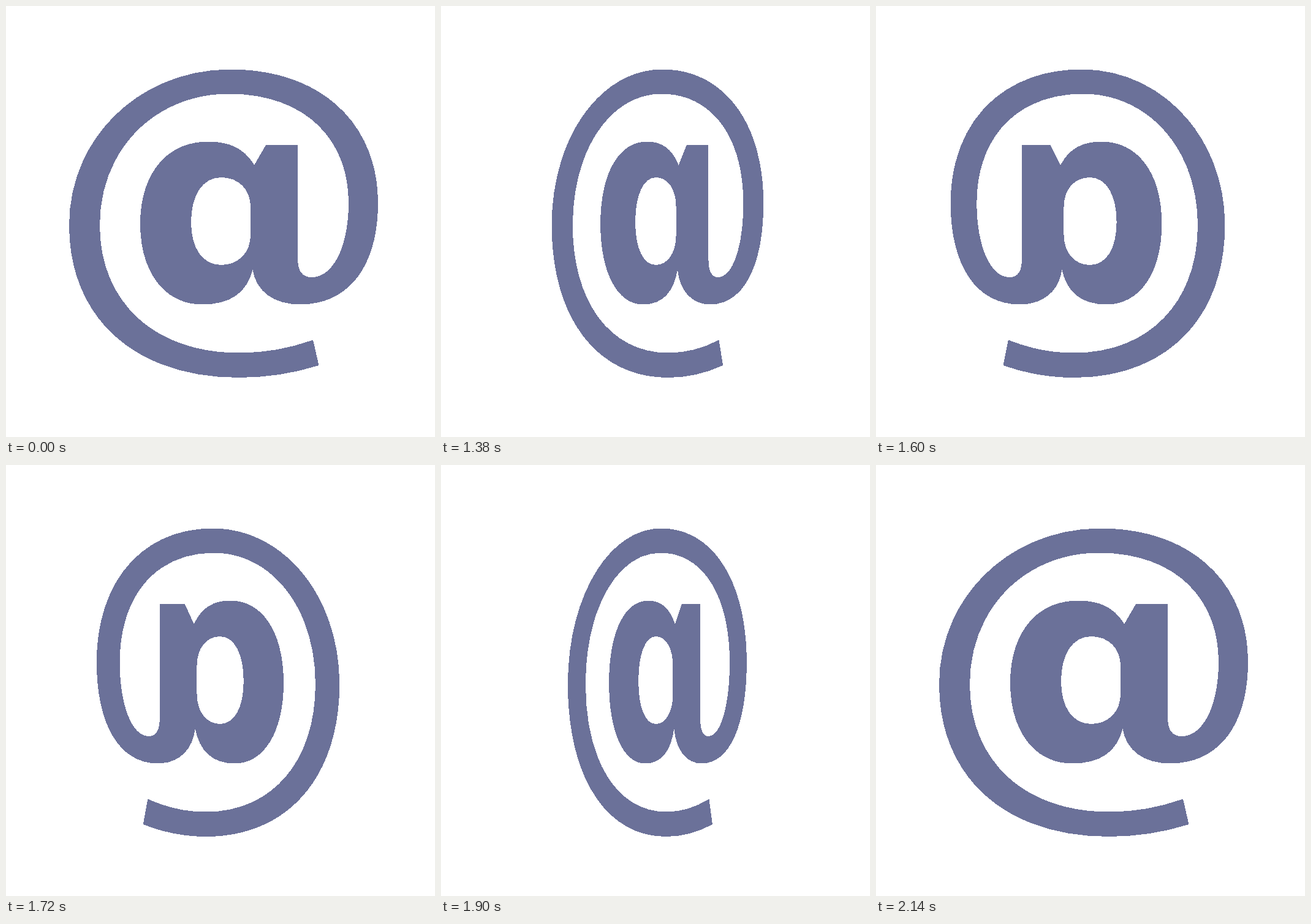
Recreate the animation shown at these times as an HTML page. Size 700 by 704 pixels, loop 2980 ms.

```html
<!DOCTYPE html>
<html lang="en">
<head>
<meta charset="utf-8">
<title>Turning at sign</title>
<style>
  html, body { margin: 0; width: 100%; height: 100%; overflow: hidden; background: #fff; }
  svg { display: block; width: 700px; height: 704px; }
  path { fill: #6b7199; fill-rule: evenodd; shape-rendering: crispEdges; }
</style>
</head>
<body>
<svg viewBox="0 0 700 704">
  <path id="sign" d="
    M510.500 587 C468 600.500 424 607 380 607
    C211 607 103 510 103 358
    C103 215 219 103.500 366 103.500
    C512 103.500 607 190 607 322
    C607 424 560 487.500 480 487.500
    C437 487.500 408 466 402.500 431
    C393 467 368 487.500 320 487.500
    C259 487.500 219 435 219 356
    C219 274 262 221.500 330 221.500
    C367 221.500 391 235 405 260
    L424 227 H476 V412
    C476 433 483 443 499 443
    C534 443 559 392 559 322
    C559 213 483 143.500 364 143.500
    C243 143.500 153 235 153 358
    C153 484 243 566.500 380 566.500
    C424 566.500 461 559.500 501 545.500 Z
    M351 280 C380 280 399 300 399 328
    V374 C399 403 379 423 351 423
    C321 423 302 396 302 353
    C302 309 321 280 351 280 Z"/>
</svg>
<script>
  const LOOP = 2980, STEP = 20;
  const START = 1158, SPIN = 984;   // one full turn, eased at both ends
  const CENTER = 350;
  const sign = document.getElementById('sign');

  const smooth = p => p * p * (3 - 2 * p);

  // Horizontal squash of a flat sign turning about its upright axis.
  function squash(t) {
    const p = Math.min(1, Math.max(0, (t - START) / SPIN));
    return Math.cos(2 * Math.PI * smooth(p));
  }

  function draw(now) {
    const t = Math.floor((now % LOOP) / STEP) * STEP;
    const s = squash(t);
    sign.setAttribute('transform', `matrix(${s} 0 0 1 ${CENTER * (1 - s)} 0)`);
  }

  let start;
  function tick(now) {
    start ??= now;
    draw(now - start);
    requestAnimationFrame(tick);
  }
  draw(0);
  requestAnimationFrame(tick);
</script>
</body>
</html>
```
